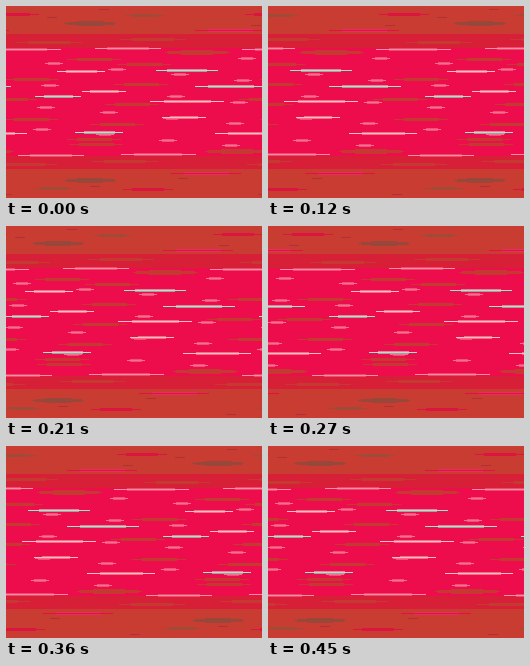
Animation, 256 px wide and 192 px high, one loop 0.48 s. Source, as an HTML page:

```html
<!DOCTYPE html>
<html lang="en">
<head>
<meta charset="utf-8">
<title>Speed streaks</title>
<style>
html, body { margin: 0; width: 100%; height: 100%; overflow: hidden; background: #c83c32; }
svg { display: block; width: 100%; height: 100%; }
</style>
</head>
<body>
<svg viewBox="0 0 256 192" preserveAspectRatio="none" shape-rendering="crispEdges">
  <rect width="256" height="192" fill="#c83c32"/>
  <rect y="28" width="256" height="135" fill="#d81f38"/>
  <rect y="42" width="256" height="108" fill="#ee0d4c"/>
  <g id="belt"></g>
</svg>
<script>
const W = 256, H = 192, STEP = 32, TICK = 30;
const NS = "http://www.w3.org/2000/svg";
const belt = document.getElementById("belt");

function bar(x, y, w, fill) {
  const width = Math.max(1, Math.round(w));
  const left = Math.round(x - width / 2);
  const set = { x: left, y, width, height: 1, fill };
  const r = document.createElementNS(NS, "rect");
  for (const k in set) r.setAttribute(k, set[k]);
  belt.appendChild(r);
}

// A streak is a stack of one-pixel bars, narrower away from the core.
// The belt spans two stage widths so that it can slide by one and wrap.
function streak(x, y, w, half, edge, core = edge) {
  const home = ((x % W) + W) % W;
  for (const shift of [-W, 0, W])
    for (let dy = -half; dy <= half; dy++) {
      const share = Math.sqrt(1 - (dy / (half + 0.3)) ** 2);
      bar(home + shift, Math.round(y) + dy, w * share, dy ? edge : core);
    }
}

// The rows repeat upside down in the lower half, at their own x.
function pair(y, top, bottom, w, ...look) {
  streak(top, y, w, ...look);
  streak(bottom, H - 1 - y, w, ...look);
}

const BROWN = "#c43a30", DARK = "#98483a", RED = "#dc1440";

// Outer bands
pair(8, 8, 142, 50, 1, RED);
pair(9, 139, 48, 40, 1, "#a04a38");
pair(17, 84, 84, 52, 2, DARK);
pair(24, 224, 200, 70, 1, "#e4305c", "#e80c48");
for (let k = 0; k < 3; k++)
  pair(3 + 8 * k, 98 - 52 * k, 1 + 88 * k, 10, 0, "#b03038");

// Inner bands
pair(33, 147, 18, 66, 1, BROWN);
pair(36, 43, 119, 66, 1, BROWN);
pair(46, 191, 231, 65, 2, BROWN);
pair(42, 122, 45, 66, 1, "#f04870", "#f890a0");
pair(43, 17, 152, 75, 1, "#f04870", "#f890a0");

// Brown shadows: two columns, one bowed and one drifting left
for (let k = 0; k < 5; k++) {
  const y = 53 + 20 * k;
  streak(4 + 21 * (k - 2) ** 2, y, 54, 1, BROWN);
  streak(138 - 3 * k * k, y + 5, 54, 1, BROWN);
}

// Small specks, evenly spaced in y and stepping about a quarter width in x
for (let i = 0; i < 17; i++)
  streak(241 + 63 * i, 52 + 5.44 * i, 18, 1, "#f05078", "#f4708c");

// Bright streaks
const pink = (x, y, w) => streak(x, y, w, 1, "#f86c88", "#f8c0c0");
const aqua = (x, y, w) => streak(x, y, w, 1, "#d8889a", "#90f0d0");

pink(75, 65, 48);
pink(98, 85, 44);
pink(181, 95, 74);
pink(178, 111, 44);
pink(243, 127, 68);
aqua(181, 64, 62);
aqua(225, 80, 72);
aqua(52, 90, 46);
aqua(93, 126, 48);

const start = performance.now();
function loop(now) {
  const tick = Math.floor(Math.max(0, now - start) / TICK);
  belt.setAttribute("transform", `translate(${tick * STEP % W} 0)`);
  requestAnimationFrame(loop);
}
loop(start);
</script>
</body>
</html>
```
